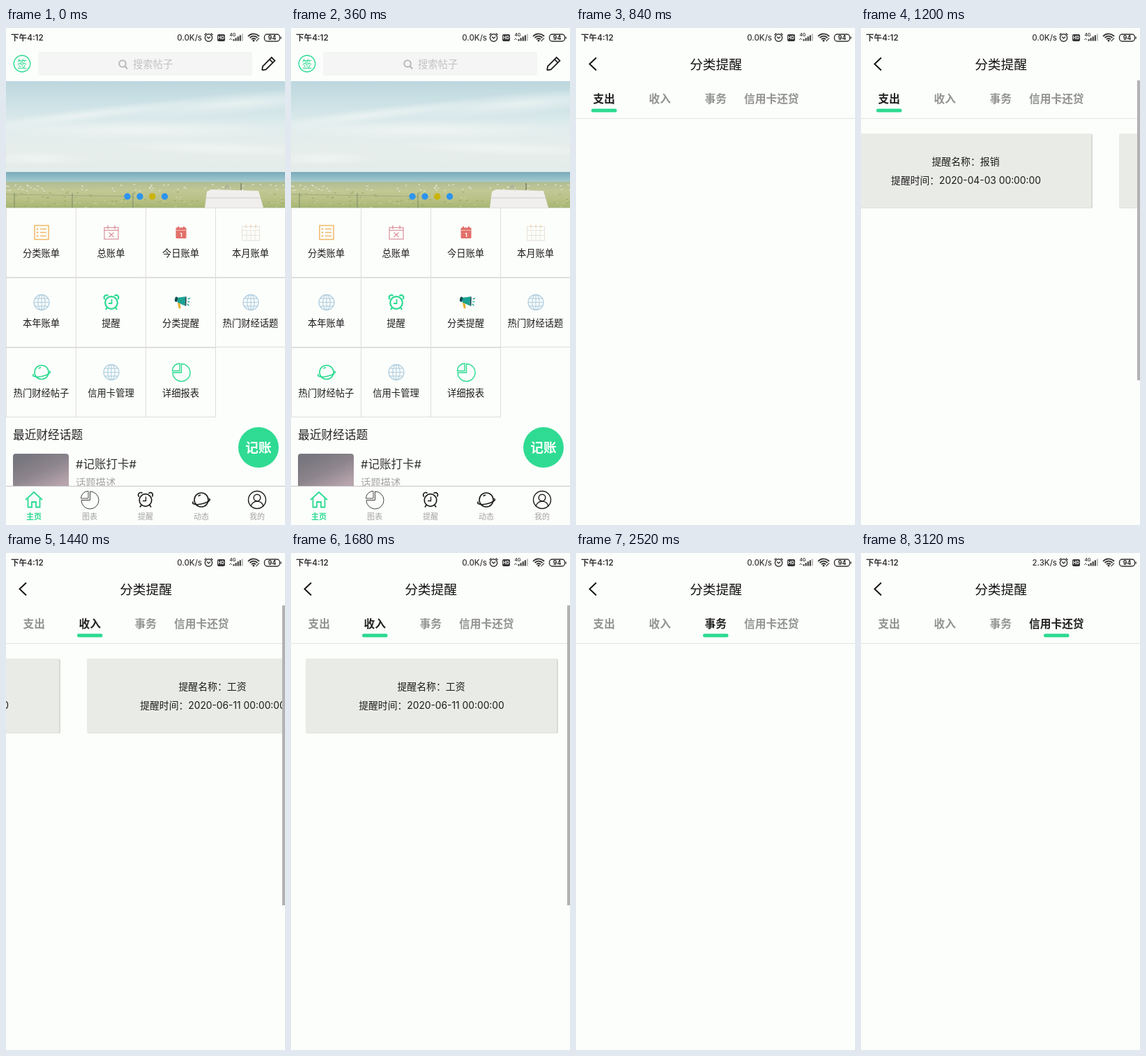
Recreate the animation shown at these times as an HTML page with a canvas. Size 400x711 px, loop 3.48 s.

```html
<!DOCTYPE html>
<html lang="zh-CN">
<head>
<meta charset="utf-8">
<title>分类提醒</title>
<style>
html, body { margin: 0; width: 100%; height: 100%; overflow: hidden; background: #fcfefb; }
canvas { display: block; width: 100%; height: 100%; }
</style>
</head>
<body>
<canvas id="stage"></canvas>
<script>
const W = 400, H = 711, LOOP = 3480, STEP = 120;
const BG = '#fcfefb', GREEN = '#2bda91', INK = '#1c1c1c', GREY = '#a3a3a3', RULE = '#dedede';
const FONT = 'Inter, "Noto Sans CJK SC", "Noto Sans CJK", sans-serif';
const canvas = document.getElementById('stage');
const g = canvas.getContext('2d');
const dpr = Math.max(1, window.devicePixelRatio || 1);
canvas.width = W * dpr;
canvas.height = H * dpr;

// ---------- helpers ----------
function text(s, x, y, size, color = INK, align = 'center', weight = 400) {
  g.font = `${weight} ${size}px ${FONT}`;
  g.textAlign = align;
  g.fillStyle = color;
  g.fillText(s, x, y + size * 0.38);
}
function rect(x, y, w, h, color) {
  g.fillStyle = color;
  g.fillRect(x, y, w, h);
}
function frame(x, y, w, h, color, width) {
  g.strokeStyle = color;
  g.lineWidth = width;
  g.strokeRect(x, y, w, h);
}
function round(x, y, w, h, r) {
  g.beginPath();
  g.roundRect(x, y, w, h, r);
}
function fill(color) { g.fillStyle = color; g.fill(); }
function stroke(color, width = 1) {
  g.strokeStyle = color;
  g.lineWidth = width;
  g.stroke();
}
function path(...p) {
  g.beginPath();
  for (let i = 0; i < p.length; i += 2) g.lineTo(p[i], p[i + 1]);
}
function line(color, width, ...p) {
  path(...p);
  stroke(color, width);
}
function circle(x, y, r) {
  g.beginPath();
  g.arc(x, y, r, 0, Math.PI * 2);
}
function at(x, y, draw) {
  g.save();
  g.translate(x, y);
  draw();
  g.restore();
}
function gradient(x0, y0, x1, y1, ...colors) {
  const f = g.createLinearGradient(x0, y0, x1, y1);
  colors.forEach((c, i) => f.addColorStop(i / (colors.length - 1), c));
  return f;
}
function seeded(seed) {
  return () => (seed = (seed * 16807) % 2147483647) / 2147483647;
}

// ---------- icons, centred on the origin ----------
function alarm(color, w) {
  circle(0, 0.5, 8.8); stroke(color, w);
  line(color, w * 0.8, 0.5, -4.5, 0.5, 1.5, -4, 1.5);
  for (const s of [-1, 1]) {
    line(color, w, s * 6, 7.5, s * 8, 10.5);
    g.beginPath();
    g.arc(s * 7, -7, 3.4, s < 0 ? 2.3 : -2.4, s < 0 ? 5.5 : 0.8);
    stroke(color, w);
  }
}
function planet(color, w) {
  circle(0, 0, 10); stroke(color, w);
  g.beginPath();
  g.ellipse(0, 2, 12.6, 3.8, -0.2, -0.45, Math.PI + 0.45);
  stroke(color, w);
  line(color, w, -4.5, -5.5, -1, -7);
}
function pie(color, w) {
  g.beginPath();
  g.moveTo(0.5, 0.5);
  g.lineTo(0.5, -12);
  g.arc(0.5, 0.5, 12.5, -Math.PI / 2, Math.PI);
  g.closePath();
  stroke(color, w);
  g.beginPath();
  g.moveTo(-2, -2);
  g.lineTo(-2, -12);
  g.arc(-2, -2, 10.5, -Math.PI / 2, Math.PI, true);
  g.closePath();
  stroke(color, w);
}
function globe() {
  const c = '#b3d0e2';
  circle(0, 0, 11); stroke(c, 1.3);
  g.beginPath();
  g.ellipse(0, 0, 5.2, 11, 0, 0, Math.PI * 2);
  stroke(c, 1.2);
  line(c, 1.2, 0, -11, 0, 11);
  for (const [y, x] of [[-5.5, 9.5], [0, 11], [5.5, 9.5]]) line(c, 1.2, -x, y, x, y);
}
function list() {
  const c = '#f0b866';
  frame(-10, -10, 20, 20, c, 1.5);
  for (const y of [-5, 0, 5]) {
    circle(-6, y, 1.3); fill(c);
    line(c, 1.5, -2, y, 7, y);
  }
}
function crossCalendar() {
  const c = '#dc97a2';
  frame(-10, -7, 20, 16.5, c, 1.3);
  line(c, 1.3, -10, -3, 10, -3);
  for (const x of [-5, 5]) line(c, 1.5, x, -10, x, -5);
  line(c, 1.3, -3.5, 0, 3.5, 6.5);
  line(c, 1.3, 3.5, 0, -3.5, 6.5);
}
function dayCalendar() {
  const c = '#e2706a';
  round(-7.5, -7, 15, 15.5, 1.5); fill(c);
  for (const x of [-4, 4]) line(c, 2, x, -8.5, x, -5);
  rect(-7.5, -3.5, 15, 1, '#f3bbb6');
  text('1', 0, 3, 8, '#fff', 'center', 700);
}
function monthCalendar() {
  const c = '#e8e2da';
  frame(-12.5, -8.5, 25, 20, c, 1.1);
  for (const y of [-3, 4]) line(c, 1, -12.5, y, 12.5, y);
  for (const x of [-6, 0, 6]) line(c, 1, x, -3, x, 11);
  for (const x of [-7, 0, 7]) line('#eed3b0', 1.3, x, -11, x, -6);
}
function megaphone() {
  g.save();
  g.rotate(0.15);
  path(-6, -6, 5, -9, 6, 4, -5, 1); fill('#1ba292');
  round(-9.5, -7, 4, 7.5, 2); fill('#174f56');
  path(-5, 1, -1, 2, 1, 9, -2, 9); fill('#e5b133');
  path(5, -9, 6.5, -9, 8, 4, 6, 4); fill('#174f56');
  for (const [y, dy] of [[-6, -2], [-2.5, 0], [1, 2]]) line('#1ba292', 1.3, 9, y, 12, y + dy);
  g.restore();
}
function house() {
  line(GREEN, 1.8, -12, 0, 0, -11, 12, 0);
  line(GREEN, 1.8, -8.5, -2, -8.5, 10.5, -3, 10.5, -3, 3, 3, 3, 3, 10.5, 8.5, 10.5, 8.5, -2);
}
function user() {
  circle(0, 0, 12.5); stroke(INK, 1.4);
  circle(0, -3, 4.8); stroke(INK, 1.4);
  g.beginPath();
  g.arc(0, 11, 9, Math.PI + 0.15, -0.15);
  stroke(INK, 1.4);
}
const icon = (draw, color, w) => () => draw(color, w);

// ---------- status bar ----------
function statusBar(speed) {
  const c = '#333';
  rect(0, 0, W, 28, BG);
  text('下午4:12', 7, 14, 11.6, c, 'left', 600);
  text(speed, 281, 14, 11.4, c, 'right', 500);
  circle(290.5, 14, 5.2); stroke(c, 1.4);
  line(c, 1.3, 288, 12.5, 290.5, 14.8, 293, 12.5);
  line(c, 1.4, 284.5, 10, 287.3, 7.5);
  line(c, 1.4, 296.5, 10, 293.7, 7.5);
  round(303, 9, 11, 10, 2); fill(c);
  text('HD', 308.5, 14, 6.3, '#fff', 'center', 700);
  text('4G', 325, 9.5, 6.5, c, 'center', 600);
  line('#555', 1, 320, 17, 322, 15, 324, 17);
  for (let i = 0; i < 5; i++) {
    const h = 2.5 + i * 1.9;
    rect(325.5 + i * 3.1, 18.5 - h, 2, h, i < 4 ? c : '#bbb');
  }
  for (const r of [4, 7.3, 10.6]) {
    g.beginPath();
    g.arc(355, 19, r, -2.42, -0.72);
    stroke(c, 1.8);
  }
  circle(355, 18, 1.5); fill(c);
  line('#555', 1.4, 358.5, 19, 363, 14.5);
  round(370.5, 9, 22, 10, 4); stroke(c, 1.4);
  text('94', 381.5, 14, 8.6, '#222', 'center', 700);
  rect(393.5, 12.5, 1.3, 3, c);
}

// ---------- home ----------
function photo() {
  g.save();
  g.beginPath();
  g.rect(0, 76, W, 181);
  g.clip();
  rect(0, 76, W, 131, gradient(0, 76, 0, 207, '#bcd7de', '#cde2e6', '#e0ecec', '#e6eeeb', '#e3ecea'));
  const clouds = [[330, 108, 190, 16, -0.08], [110, 125, 170, 10, -0.12], [190, 146, 220, 14, 0],
    [45, 187, 80, 10, 0], [300, 172, 150, 10, 0.04]];
  for (const [x, y, rx, ry, tilt] of clouds) at(x, y, () => {
    g.rotate(tilt);
    g.scale(rx, ry);
    const f = g.createRadialGradient(0, 0, 0, 0, 0, 1);
    f.addColorStop(0, 'rgba(243,247,245,.7)');
    f.addColorStop(1, 'rgba(243,247,245,0)');
    circle(0, 0, 1); fill(f);
  });
  rect(0, 206, W, 15, gradient(0, 206, 0, 221, '#79aabb', '#8fbcc5', '#a9cdcd'));
  rect(0, 220, W, 37, gradient(0, 220, 0, 257, '#aebc95', '#c2c794', '#b9c187', '#a6b673'));
  const rnd = seeded(17);
  for (let i = 0; i < 55; i++) rect(rnd() * W, 223 + rnd() * 10, 2.5, 1.3, '#e3e5d2');
  for (let i = 0; i < 120; i++) rect(rnd() * W, 234 + rnd() * 22, 3, 1, i % 2 ? '#97a766' : '#cdcfa0');
  line('#94a07a', 0.7, 0, 238, 182, 241);
  for (const x of [12, 95, 182]) line('#7b8a6a', 1, x, 236, x, 257);
  line('#5f6257', 1, 337, 222, 337, 232);
  path(285, 257, 288, 234, 294, 231, 362, 233, 369, 257); fill('#f0efed');
  line('#cfccc9', 1, 287, 243, 366, 243);
  line('#aaa7a3', 1.3, 314, 230, 317, 225, 320, 230);
  [174, 192, 209.7, 227.5].forEach((x, i) => {
    circle(x, 241, 4.7); fill(i === 2 ? '#cbb30d' : '#2d94ee');
  });
  g.restore();
}
const cells = [
  ['分类账单', list], ['总账单', crossCalendar], ['今日账单', dayCalendar], ['本月账单', monthCalendar],
  ['本年账单', globe], ['提醒', icon(alarm, GREEN, 2.2)], ['分类提醒', megaphone], ['热门财经话题', globe],
  ['热门财经帖子', icon(planet, GREEN, 1.6)], ['信用卡管理', globe], ['详细报表', icon(pie, GREEN, 1.4)]
];
function grid() {
  cells.forEach(([name, draw], i) => {
    const x = (i % 4) * 100, y = 257 + Math.floor(i / 4) * 100;
    frame(x + 0.5, y + 0.5, 100, 99, RULE, 1);
    at(x + 51, y + 35.5, draw);
    text(name, x + 50.5, y + 65, 13.3);
  });
}
const tabs = [
  ['主页', house], ['图表', icon(pie, '#444', 1)], ['提醒', icon(alarm, INK, 1.7)],
  ['动态', icon(planet, INK, 1.6)], ['我的', user]
];
function home() {
  rect(0, 28, W, H, BG);
  circle(23, 51, 11.7); stroke(GREEN, 1.4);
  text('签', 23, 51, 14.5, GREEN);
  round(46, 34, 307, 34, 4); fill('#f4f5f4');
  circle(167, 51, 4.8); stroke('#b9b9b9', 2);
  line('#b9b9b9', 2.2, 170.5, 54.5, 174, 58.5);
  text('搜索帖子', 182, 52, 14.3, '#c2c2c2', 'left');
  at(376, 51.5, () => {
    g.rotate(-Math.PI / 4);
    line(INK, 1.8, -12.5, 0, -8, -3.3, 10, -3.3, 10, 3.3, -8, 3.3, -12.5, 0);
    line(INK, 1.6, 6, -3.3, 6, 3.3);
  });
  photo();
  grid();
  text('最近财经话题', 10, 582, 16.7, '#222', 'left');
  round(10, 609, 80, 60, 4); fill(gradient(35, 609, 60, 662, '#77757d', '#8d858d', '#b7a4ac'));
  text('#记账打卡#', 100, 624, 16.5, '#333', 'left');
  text('话题描述', 100, 651, 14.3, GREY, 'left');
  circle(362, 600, 29); fill('#2fdb93');
  text('记账', 362, 600, 18.7, '#fff', 'center', 700);
  rect(0, 655, W, 56, BG);
  line('#c4c4c4', 1, 0, 655.5, W, 655.5);
  tabs.forEach(([name, draw], i) => {
    at(40 + i * 80, 675, draw);
    text(name, 40 + i * 80, 698.5, 11, i ? GREY : GREEN, 'center', i ? 400 : 700);
  });
}

// ---------- reminders ----------
const kinds = ['支出', '收入', '事务', '信用卡还贷'];
const cards = [['报销', '2020-04-03 00:00:00'], ['工资', '2020-06-11 00:00:00']];
function reminders(active, scroll, loaded, bar) {
  rect(0, 28, W, H, BG);
  line('#111', 1.9, 29, 42.5, 19.5, 51.5, 29, 60.5);
  text('分类提醒', 200.5, 52, 18.7, '#111');
  kinds.forEach((name, i) => {
    text(name, 40.3 + i * 80, 101.5, 15.7, i === active ? '#222' : '#929392', 'center', 700);
  });
  round(22 + active * 80, 115.5, 36.5, 5, 2.2); fill(GREEN);
  line('#e3e4e2', 1, 0, 129.5, W, 129.5);
  if (loaded) cards.forEach(([name, time], i) => {
    const x = i * W - scroll;
    round(x + 21.5, 151.5, 361.5, 106.5, 2); fill('#d8dad6');
    round(x + 21, 151, 360, 106.5, 2); fill('#e9ebe6');
    text('提醒名称：' + name, x + 201, 191, 13.9);
    text('提醒时间：' + time, x + 201.5, 218, 13.8);
  });
  if (bar) rect(396, 75, 4, 429, '#b2b2b2');
}

// ---------- timeline ----------
const swipes = [
  [1080, [0, 51, 185, 305, 373, 400]],
  [1800, [0, 14, 65, 195, 310, 373, 400]]
];
const easeInOut = p => (1 - Math.cos(Math.PI * Math.min(1, Math.max(0, p)))) / 2;

function render(ms) {
  const t = Math.floor(ms / STEP) * STEP;
  g.setTransform(canvas.width / W, 0, 0, canvas.height / H, 0, 0);
  rect(0, 0, W, H, BG);
  const p = easeInOut((t - 488) / 300);
  const scroll = swipes.reduce((sum, [start, offsets]) => {
    const i = Math.min(offsets.length - 1, Math.max(0, (t - start) / STEP));
    return sum + offsets[i];
  }, 0);
  const active = t >= 3120 ? 3 : Math.round(scroll / W);
  if (p < 1) at(-100 * p, 0, home);
  if (p > 0) at(W * (1 - p), 0, () => reminders(active, scroll, t >= 960, t >= 1200 && t < 1800));
  statusBar(t >= 2880 ? '2.3K/s' : '0.0K/s');
}
const begin = performance.now();
function tick() {
  render((performance.now() - begin) % LOOP);
  requestAnimationFrame(tick);
}
tick();
</script>
</body>
</html>
```
